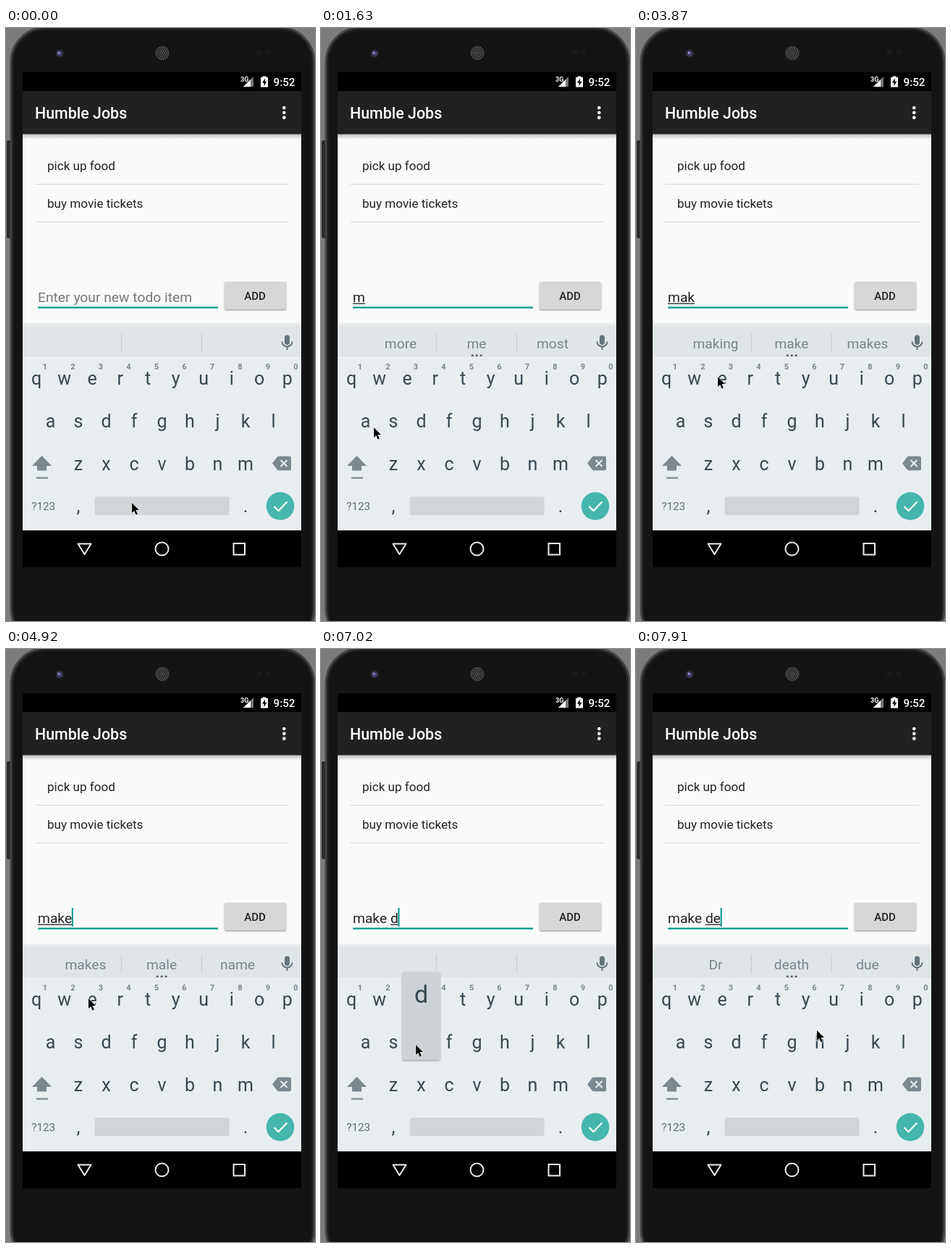
Recreate the animation shown at these times as an HTML page. Size 427x818 px, loop 8000 ms.

```html
<!DOCTYPE html>
<html lang="en">
<head>
<meta charset="utf-8">
<style>
html, body { margin: 0; width: 100%; height: 100%; overflow: hidden; background: #7c7c7c; }
svg { display: block; font-family: Roboto, sans-serif; }
.mid { text-anchor: middle; }
.key { font-size: 25px; fill: #37474f; text-anchor: middle; }
.hint { font-size: 11px; font-weight: 700; fill: #7b878c; text-anchor: middle; }
.item { font-size: 17.1px; fill: #212121; }
.word { font-size: 19.25px; fill: #78868d; text-anchor: middle; }
.nav { fill: none; stroke: #eee; stroke-width: 2; }
</style>
</head>
<body>
<svg width="427" height="818" viewBox="0 0 427 818">
  <defs>
    <linearGradient id="fade" x2="0" y2="1">
      <stop stop-color="#000" stop-opacity=".24"/>
      <stop offset="1" stop-color="#000" stop-opacity="0"/>
    </linearGradient>
    <filter id="soft" x="-20%" y="-20%" width="140%" height="150%">
      <feDropShadow dx="0" dy="1.3" stdDeviation="1" flood-opacity=".4"/>
    </filter>
  </defs>

  <!-- phone body -->
  <rect x="1" y="155" width="6" height="135" rx="2" fill="#2b2b2b"/>
  <rect x="7" y="-1" width="419" height="851" rx="48" fill="#141414" stroke="#454545" stroke-width="3"/>
  <rect x="9.5" y="2" width="414" height="845" rx="45" fill="none" stroke="#222" stroke-width="2"/>
  <circle cx="74" cy="35" r="5.5" fill="#2e2e38"/>
  <circle cx="74" cy="35" r="3" fill="#4d4b86"/>
  <circle cx="73" cy="34" r="1.2" fill="#a5a6d2"/>
  <circle cx="216" cy="34.5" r="10" fill="#262626"/>
  <g id="mesh" fill="#626262"></g>
  <circle cx="350" cy="34" r="4" fill="#1c1a1a"/>
  <circle cx="363" cy="34" r="3" fill="#1d1a1a"/>

  <!-- status bar -->
  <rect x="23" y="61" width="385" height="683"/>
  <g fill="#fff">
    <text x="324" y="74" font-size="9" font-weight="700">3G</text>
    <path d="M342 67V81H328Z" fill="#777"/>
    <path d="M338 71V81H328Z"/>
    <path d="M354.5 68V66.5H359.5V68H362V81.5H352V68Z"/>
    <path d="M358 69.5L354 75.5H356.5V80L360.5 73.8H358Z" fill="#000"/>
    <text x="369.5" y="79.5" font-size="15.2" font-weight="500">9:52</text>
  </g>

  <!-- app -->
  <rect x="23" y="87" width="385" height="60" fill="#212121"/>
  <text x="40" y="125" font-size="21.4" font-weight="500" fill="#fff">Humble Jobs</text>
  <g fill="#fff">
    <circle cx="384.3" cy="110" r="2.3"/><circle cx="384.3" cy="116.8" r="2.3"/><circle cx="384.3" cy="123.6" r="2.3"/>
  </g>
  <rect x="23" y="146.5" width="385" height="264.5" fill="#fafafa"/>
  <rect x="23" y="146.5" width="385" height="7" fill="url(#fade)"/>
  <text class="item" x="57" y="195.500">pick up food</text>
  <text class="item" x="57" y="248">buy movie tickets</text>
  <path d="M40 215.5H391M40 267.5H391" stroke="#dadada"/>
  <rect x="44" y="384.500" width="249" height="2.2" fill="#009688"/>
  <text id="hintText" x="44" y="378" font-size="19.25" fill="#777">Enter your new todo item</text>
  <text id="typed" x="44" y="378" font-size="19.25" fill="#212121"></text>
  <rect id="line" y="379.500" height="1.3" fill="#212121"/>
  <rect id="caret" y="357" width="2" height="26" fill="#009688"/>
  <rect x="302" y="350" width="85" height="38" rx="2" fill="#d6d7d7" filter="url(#soft)"/>
  <text class="mid" x="344" y="375" font-size="15" font-weight="500" fill="#212121">ADD</text>

  <!-- keyboard -->
  <rect x="23" y="407" width="385" height="4" fill="#e9ebec"/>
  <rect x="23" y="410.500" width="385" height="44" fill="#e0e5e8"/>
  <rect x="23" y="454" width="385" height="239" fill="#e8edf0"/>
  <path d="M23 455H408" stroke="#f2f5f6" stroke-width="1.5"/>
  <path d="M159.500 421V447M270.500 421V447" stroke="#c6ced2"/>
  <g id="words">
    <text class="word" x="110" y="442"></text>
    <text class="word" x="215" y="442"></text>
    <text class="word" x="320" y="442"></text>
    <path d="M207.800 450.500h3v2.500h-3zM213.700 450.500h3v2.500h-3zM219.600 450.500h3v2.500h-3z" fill="#56656c"/>
  </g>
  <rect x="385" y="423.500" width="7" height="13.500" rx="3.500" fill="#64747b"/>
  <path d="M381.500 432.500a7 7 0 0 0 14 0M388.500 439.500V444" fill="none" stroke="#64747b" stroke-width="2"/>
  <g id="keys"></g>
  <g fill="#7b898f">
    <path d="M49.500 590L63 604H56V610.500H43V604H36Z"/>
    <rect x="42" y="619.500" width="16" height="2.200"/>
    <path d="M368 600.500L375 591.500Q375.700 590.700 377 590.700H392Q394 590.700 394 592.500V608.500Q394 610.300 392 610.300H377Q375.700 610.300 375 609.500Z"/>
  </g>
  <path d="M379.500 596L388.500 605M388.500 596L379.500 605" stroke="#e8edf0" stroke-width="2"/>
  <text class="mid" x="51.700" y="665" font-size="15.300" fill="#5f6f76">?123</text>
  <rect x="122.500" y="646.500" width="186" height="25.500" rx="3" fill="#d0d5d8"/>
  <circle cx="379" cy="659.500" r="19.300" fill="#46b6ac"/>
  <path d="M370.500 660L376.500 666L388.500 653.500" fill="none" stroke="#fff" stroke-width="2.200"/>
  <g id="popup">
    <rect x="-26" y="-97" width="52" height="121" rx="2" fill="#ccd2d5" filter="url(#soft)"/>
    <text class="mid" y="-54.500" font-size="34" fill="#37474f"></text>
  </g>

  <!-- navigation bar -->
  <path class="nav" d="M99.500 711.500H117.500L108.500 726Z" stroke-linejoin="round"/>
  <circle class="nav" cx="215.500" cy="718.500" r="9"/>
  <rect class="nav" x="314.500" y="711" width="15.500" height="15.500"/>

  <path id="pointer" d="M0 0V14L3.200 11L5.600 16.600L7.900 15.600L5.500 10.100H10Z" stroke="#fff" stroke-width="1.200" paint-order="stroke"/>
</svg>
<script>
const LOOP = 8000, TICK = 149.4, PITCH = 38.5;
const $ = id => document.getElementById(id);
const show = (el, on) => el.setAttribute('visibility', on ? 'visible' : 'hidden');
const set = (el, attrs) => { for (const k in attrs) el.setAttribute(k, attrs[k]); };

function add(parent, tag, attrs, text = '') {
  const el = document.createElementNS('http://www.w3.org/2000/svg', tag);
  set(el, attrs);
  el.textContent = text;
  parent.append(el);
  return el;
}

// speaker mesh
for (let r = 0; r < 4; r++) {
  const n = r * 6 || 1;
  for (let i = 0; i < n; i++) {
    const a = i / n * 2 * Math.PI;
    add($('mesh'), 'circle', { cx: 216 + r * 2.8 * Math.cos(a), cy: 34.5 + r * 2.8 * Math.sin(a), r: 0.9 });
  }
}

// keys
const keyPos = {};
[['qwertyuiop', 42.2, 492], ['asdfghjkl', 61.5, 551], ['zxcvbnm', 100, 609.5]].forEach(([row, x0, y]) => {
  [...row].forEach((c, i) => {
    const x = x0 + i * PITCH;
    keyPos[c] = [x, y];
    add($('keys'), 'text', { class: 'key', x, y }, c);
  });
});
[...'1234567890'].forEach((c, i) => add($('keys'), 'text', { class: 'hint', x: 54 + i * PITCH, y: 471 }, c));
add($('keys'), 'text', { class: 'key', x: 100, y: 668 }, ',');
add($('keys'), 'text', { class: 'key', x: 331, y: 668 }, '.');

// timelines, in ticks
const typing = [[0, ''], [8, 'm'], [15, 'ma'], [22, 'mak'], [32, 'make'], [41, 'make '], [47, 'make d'], [52, 'make de']];
const hints = [[0, ''], [9, 'more me most'], [16, 'made MA many'], [23, 'making make makes'],
  [33, 'makes male name'], [42, ''], [48, 'Dr death due']];
const popups = [[0, ''], [47, 'd'], [48, ''], [52, 'e'], [53, '']];
const blinks = [[0, 0], [1, 1], [4, 0], [8, 1], [11, 0], [15, 1], [18, 0], [22, 1], [25, 0], [28, 1], [30, 0],
  [32, 1], [35, 0], [38, 1], [44, 0], [47, 1], [50, 0], [52, 1]];
const path = [[0, 174, 655], [1, 174, 655], [6, 324, 603], [9, 324, 603], [11, 73, 551], [13, 65, 544],
  [15, 65, 544], [20, 331, 542], [22, 331, 542], [26, 113, 481], [28, 114, 482], [35, 114, 482],
  [39, 181, 659], [41, 181, 659], [45, 131, 546], [47, 131, 546], [50, 115, 483], [52, 115, 483], [53, 250, 526]];

const at = (table, n) => table.findLast(e => e[0] <= n)[1];

function pointerAt(n) {
  const i = path.findLastIndex(p => p[0] <= n);
  const a = path[i], b = path[i + 1] || a;
  const u = b === a ? 0 : (n - a[0]) / (b[0] - a[0]);
  const e = u * u * (3 - 2 * u);
  return [a[1] + (b[1] - a[1]) * e, a[2] + (b[2] - a[2]) * e];
}

const pen = document.createElement('canvas').getContext('2d');
function widthOf(s) {
  pen.font = '19.25px Roboto, sans-serif';
  return pen.measureText(s).width;
}

const words = $('words').querySelectorAll('text');

function draw(n) {
  const text = at(typing, n), end = 44 + widthOf(text);
  const start = 44 + widthOf(text.slice(0, text.lastIndexOf(' ') + 1));
  $('typed').textContent = text;
  show($('hintText'), !text);
  set($('line'), { x: start, width: end - start });
  set($('caret'), { x: end - 0.3 });
  show($('caret'), at(blinks, n));

  const list = at(hints, n).split(' ');
  words.forEach((w, i) => w.textContent = list[i] || '');
  show($('words'), list[0]);

  const c = at(popups, n);
  show($('popup'), c);
  if (c) {
    const [x, y] = keyPos[c];
    set($('popup'), { transform: `translate(${x} ${y - 8.5})` });
    $('popup').lastElementChild.textContent = c;
  }
  set($('pointer'), { transform: `translate(${pointerAt(n)})` });
}

function frame() {
  draw(Math.floor((performance.now() % LOOP + 15) / TICK));
  requestAnimationFrame(frame);
}
frame();
</script>
</body>
</html>
```
